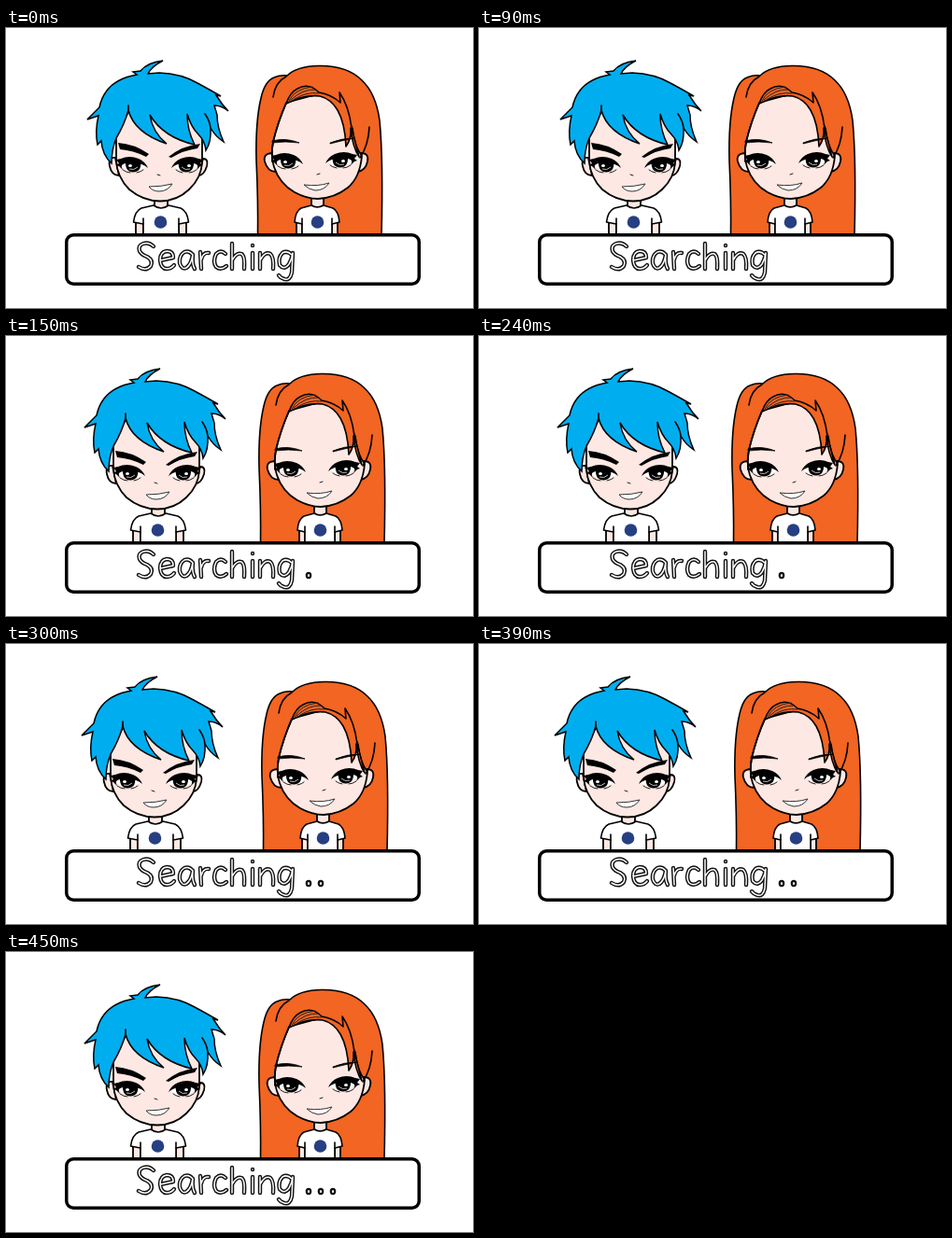
Recreate the animation shown at these times as an HTML page. Size 500 by 300 pixels, loop 0.6 s.

```html
<!DOCTYPE html>
<html lang="en">
<head>
<meta charset="utf-8">
<title>Searching</title>
<style>
html, body { margin: 0; width: 100%; height: 100%; overflow: hidden; background: #fff; }
svg { display: block; width: 500px; height: 300px; }
.line { fill: none; stroke: #000; stroke-width: 1.6; stroke-linecap: round; stroke-linejoin: round; }
.thin { fill: none; stroke: #222; stroke-width: 1; stroke-linecap: round; }
.skin { fill: #fee8e3; stroke: #000; stroke-width: 1.8; stroke-linejoin: round; }
.shirt { fill: #fff; stroke: #000; stroke-width: 1.6; stroke-linejoin: round; }
.blue { fill: #00aeef; stroke: #000; stroke-width: 1.5; stroke-linejoin: miter; }
.orange { fill: #f26522; stroke: #000; stroke-width: 1.6; stroke-linejoin: round; }
.badge { fill: #263f82; }
.mouth { fill: #fff; stroke: #333; stroke-width: 1; }
.letters { fill: none; stroke-linecap: round; stroke-linejoin: round; }
#dots { fill: #fff; stroke: #111; stroke-width: 2.2; }
</style>
</head>
<body>
<svg viewBox="0 0 500 300" role="img" aria-label="Searching">
  <defs>
    <!-- one half-closed eye, outer corner on the left -->
    <g id="eye">
      <path d="M-14-2Q-4-7 6-4L14 2Q9 7 1 8Q-8 8-14-1Z" fill="#fff"/>
      <path d="M-8-4H8Q10 8 0 8.500Q-9 8-8-4Z"/>
      <path d="M-18-5L-13-6Q-4-10 6-6Q13-3 16 4Q10-1 3-1Q-7-3-12 1Q-13 3-11 6L-15 2L-18 1L-15-1Z"/>
      <path class="thin" d="M-11 6Q-7 9-3 9M4 9Q9 8 11 6"/>
      <ellipse cx="-3" cy="1.500" rx="2" ry="1.500" fill="#fff"/>
      <path d="M-4 5Q1 7 5 3" fill="none" stroke="#bbb"/>
    </g>
    <g id="word">
      <path d="M158 234Q153 229 147 231Q141 233 143 239Q145 243 151 245Q158 249 155 255Q150 261 142 256"/>
      <path d="M165 249L179 246Q179 239 172 239Q165 240 165 249Q166 258 172 258Q177 258 180 254"/>
      <path d="M200 243Q196 238 191 240Q185 244 186 252Q188 259 193 257Q198 254 200 243Q199 253 202 258"/>
      <path d="M208 240L209 258M209 248Q211 240 217 241"/>
      <path d="M235 242Q230 237 225 242Q221 250 225 256Q230 260 236 255"/>
      <path d="M242 231V258M242 249Q247 240 252 242Q256 244 255 258"/>
      <path d="M264 241V258M264 233V233.100"/>
      <path d="M272 241V258M272 249Q277 239 283 242Q287 246 286 258"/>
      <path d="M306 243Q301 238 296 241Q291 246 293 254Q298 260 303 253Q306 248 307 241L306 262Q304 271 298 269Q294 268 292 265"/>
    </g>
  </defs>
  <rect width="500" height="300" fill="#fff"/>

  <g id="boy">
    <path class="skin" d="M139 208V223H147V208ZM185 208V223H193V208Z"/>
    <path class="skin" d="M159 183V192Q166 196 173 192V183Z"/>
    <path class="shirt" d="M147 223V210L136.500 208Q138 196 145 193L158 190Q166 196 174 190L187 193Q194 196 195.500 208L185 210V223Z"/>
    <path class="line" d="M147 210V204M185 210V204"/>
    <circle class="badge" cx="165.500" cy="208" r="6.800"/>
    <path class="skin" d="M117 139Q109 138 111 148Q113 158 121 158ZM211 140Q217 140 215 148Q212 158 206 158Z"/>
    <path class="skin" d="M118 110V142Q119 160 132 173Q147 185.500 165 185.500Q183 185.500 196 173Q209 161 210 144V106L178 77H140Z"/>
    <path class="blue" d="M168 35Q151 37 144 46L136 47L140 50Q118 54 108 67Q102 75 100 85L87 98L99 94Q95 111 98 125L102 121Q103 136 113 145Q113 130 118 118Q127 103 131 88Q137 112 172 124Q157 112 154 93Q168 117 202 125Q194 110 194 92Q198 106 206 114Q213 121 214 131Q220 122 219 107Q224 116 233 122Q226 107 226 93L223 83Q231 83 238 89Q231 82 225 72L230 73Q218 66 205 59Q188 49 164 48L152 49Q156 41 168 35Z"/>
    <path class="line" d="M131 88L131 83M219 107Q218 99 213 92"/>
    <path d="M120 123Q137 124 153 135L150 138Q136 131 122 130ZM174 138Q189 126 208 124L205 129Q190 131 177 139Z"/>
    <use href="#eye" x="136" y="146"/>
    <use href="#eye" transform="translate(193 146) scale(-1 1)"/>
    <path class="thin" d="M162 157L165 158"/>
    <path class="mouth" d="M153 170Q167 170 178 167Q173 175 164 175Q157 175 153 170Z"/>
  </g>

  <g id="girl">
    <path class="orange" d="M269.500 223Q270 185 268 142Q267 100 273 75Q277 57 287 53Q294 50 301 51Q311 41 335 40.500Q365 40 381 56Q396 70 400 99Q404 140 402 223Z"/>
    <path class="skin" d="M311 208V223H317V208ZM349 208V223H355V208Z"/>
    <path class="skin" d="M327 181V190Q333 194 340 190V181Z"/>
    <path class="shirt" d="M317 223V210L309 208Q310 196 316 193L327 190Q333 194 340 190L350 193Q356 196 357 208L349 210V223Z"/>
    <path class="line" d="M317 210V204M349 210V204"/>
    <circle class="badge" cx="333.500" cy="208" r="6.800"/>
    <path class="skin" d="M286 134Q275 134 277 143Q280 154 289 154ZM380 134Q389 134 387 143Q385 153 376 154Z"/>
    <path class="skin" d="M300 80Q291 101 286 122Q283 137 287 149Q293 167 309 176Q322 183 334 183Q352 182 366 171Q379 160 381 137Q373 127 371 108L358 80L337 70Z"/>
    <path class="orange" d="M300 81Q304 69 312 65Q324 58 335 69Q348 71 358 80L357 69Q367 83 370 107L378 138Q371 128 369 107Q370 119 364 127Q363 102 355 88Q348 76 336 73Q320 71 300 81Z"/>
    <path class="thin" d="M303 78Q309 65 328 63M305 77Q318 65 331 66M309 76Q322 68 335 70"/>
    <path class="line" d="M300 81Q291 101 286 122Q284 132 285 143M300 52Q288 58 286 74M389 106Q388 126 379 139"/>
    <path d="M285 121Q299 117 314 123Q299 121 285 123ZM347 123Q359 118 373 118Q358 121 347 124Z" stroke="#000" stroke-width="0.800"/>
    <use href="#eye" x="302" y="142"/>
    <use href="#eye" transform="translate(358 141) scale(-1 1)"/>
    <path class="thin" d="M333 157L336 156"/>
    <path class="mouth" d="M319 168Q334 170 346 166Q341 174 331 174Q324 173 319 168Z"/>
  </g>

  <rect x="64.750" y="221.750" width="377.500" height="52.500" rx="7.500" fill="#fff" stroke="#000" stroke-width="3.500"/>
  <g class="letters">
    <use href="#word" stroke="#111" stroke-width="4.400"/>
    <use href="#word" stroke="#fff" stroke-width="1.500"/>
  </g>
  <g id="dots">
    <ellipse cx="324" cy="256.500" rx="2.200" ry="2.600"/>
    <ellipse cx="337" cy="256.500" rx="2.200" ry="2.600"/>
    <ellipse cx="350" cy="256.500" rx="2.200" ry="2.600"/>
  </g>
</svg>
<script>
const STEP = 150;
const SWAY = 3;
const boy = document.getElementById("boy");
const girl = document.getElementById("girl");
const dots = [...document.getElementById("dots").children];
const start = performance.now();

function draw(ms) {
  const step = Math.floor(ms / STEP) % 4;
  const shift = SWAY * (2 - Math.abs(2 - step));
  boy.setAttribute("transform", `translate(${-shift} 0)`);
  girl.setAttribute("transform", `translate(${shift} 0)`);
  dots.forEach((dot, i) => dot.setAttribute("visibility", i < step ? "visible" : "hidden"));
}

function tick() {
  draw(performance.now() - start);
  requestAnimationFrame(tick);
}
draw(0);
requestAnimationFrame(tick);
</script>
</body>
</html>
```
